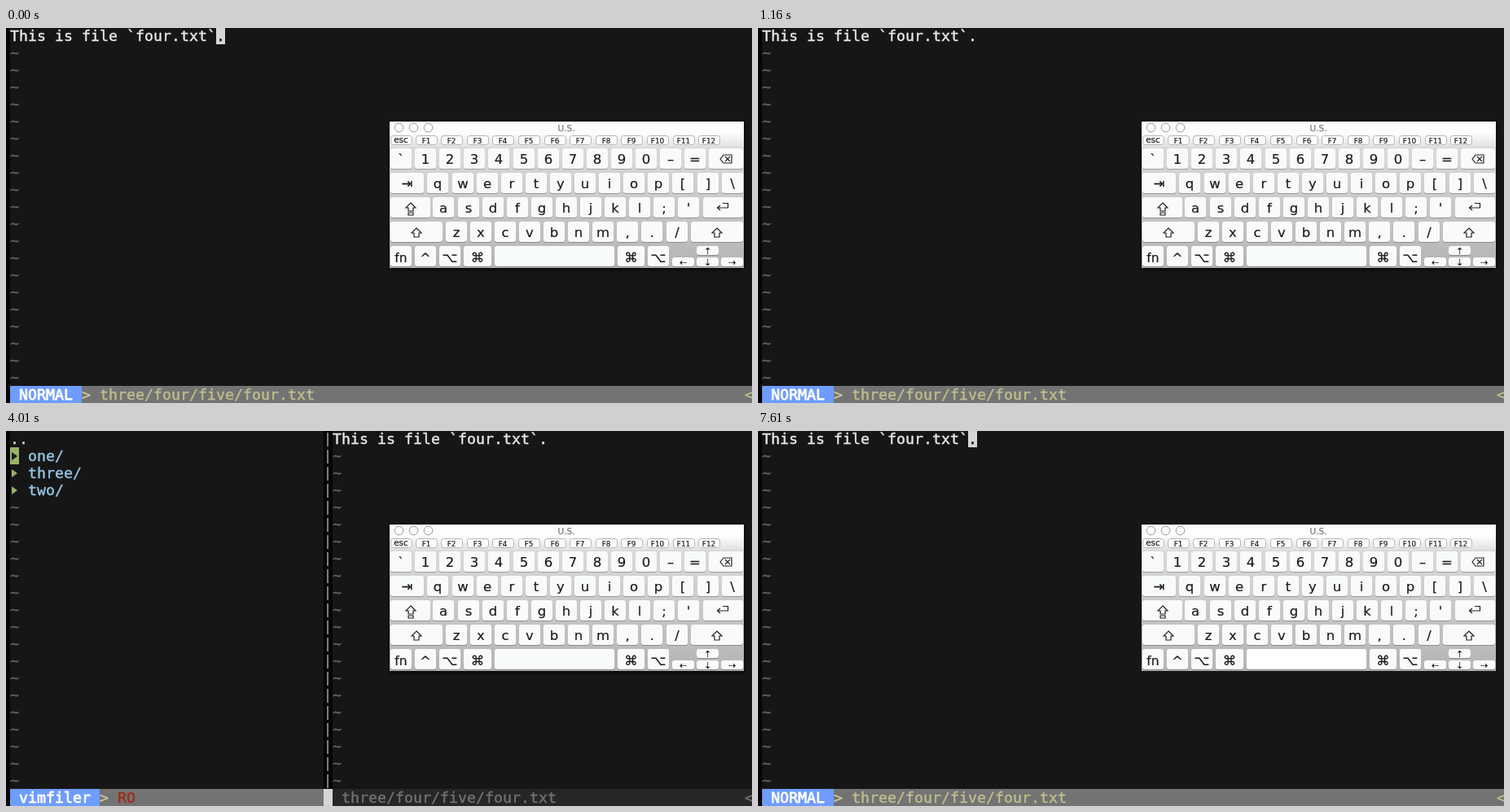
Animation of 916x461 px, one loop 8 s. Source, as an HTML page with a canvas:

```html
<!DOCTYPE html>
<html lang="en">
<head>
<meta charset="utf-8">
<title>Editor and keyboard</title>
<style>
html, body { margin: 0; width: 100%; height: 100%; overflow: hidden; background: #000; }
canvas { display: block; }
</style>
</head>
<body>
<canvas id="stage" width="916" height="461"></canvas>
<script>
const ctx = document.getElementById('stage').getContext('2d');
const LOOP = 8000, COL = 11, ROW = 21, LEFT = 5;
const MONO = '18.27px "DejaVu Sans Mono", monospace';
const SANS = '"DejaVu Sans", sans-serif';
const BG = '#161616', FG = '#e6e6e6', BLUE = '#6f9cff', GREEN = '#99b268', BAR = '#737373';

// Key presses: [key, down, up]
const presses = [
  ['space', 500, 710], ['t', 710, 860], ['r', 1010, 1160],
  ['space', 3410, 3560], ['t', 3860, 4010], ['r', 4460, 4610],
  ['space', 7460, 7610]
];

function rect(x, y, w, h, color) {
  ctx.fillStyle = color;
  ctx.fillRect(x, y, w, h);
}

// Text with a thin outline, for slightly heavier strokes
function glyphs(text, x, y, color, weight) {
  ctx.fillStyle = ctx.strokeStyle = color;
  ctx.lineWidth = weight;
  ctx.lineJoin = 'round';
  ctx.fillText(text, x, y);
  ctx.strokeText(text, x, y);
}

// ---- terminal grid ----
const colX = c => LEFT + c * COL;
const rowY = r => r ? r * ROW - 1 : 0;

function write(text, col, row, color, weight = 0.45) {
  ctx.font = MONO;
  ctx.textAlign = 'left';
  [...text].forEach((ch, i) => glyphs(ch, colX(col + i), row * ROW + 16, color, weight));
}

function cells(col, row, count, color) {
  const y = rowY(row);
  rect(colX(col), y, count * COL, (row + 1) * ROW - 1 - y, color);
}

function tildes(col, first) {
  for (let r = first; r <= 20; r++) write('~', col, r, '#686868', 0.3);
}

function statusBar(label, from, to, color) {
  rect(from, 440, to - from, 21, color);
  if (label) {
    rect(LEFT, 440, (label.length + 2) * COL, 21, BLUE);
    write(label, 1, 21, '#fff', 0.8);
    write('>', label.length + 2, 21, '#c8c8a0');
  }
}

function marker(row, color) {
  const y = row * ROW + 10;
  ctx.fillStyle = color;
  ctx.beginPath();
  ctx.moveTo(7, y - 5);
  ctx.lineTo(14, y);
  ctx.lineTo(7, y + 5);
  ctx.fill();
}

function drawEditor(cursor) {
  write('This is file `four.txt`', 0, 0, FG);
  if (cursor) cells(23, 0, 1, '#d6d6d6');
  write('.', 23, 0, cursor ? BG : FG);
  tildes(0, 1);
  statusBar('NORMAL', LEFT, 916, BAR);
  write('three/four/five/four.txt', 10, 21, '#bdbd8e');
  write('<', 82, 21, '#bdbd8e');
}

function drawExplorer() {
  write('..', 0, 0, '#d0d0d0');
  cells(0, 1, 1, GREEN);
  ['one/', 'three/', 'two/'].forEach((name, i) => {
    marker(i + 1, i ? GREEN : BG);
    write(name, 2, i + 1, '#93c4e2');
  });
  tildes(0, 4);
  rect(390, 0, 11, 440, '#050505');
  for (let r = 0; r <= 20; r++) rect(394, r * ROW + 2, 2, 17, '#857a6c');
  write('This is file `four.txt`.', 36, 0, FG);
  tildes(36, 1);
  statusBar('vimfiler', LEFT, 390, BAR);
  write('RO', 12, 21, '#9c2b16');
  rect(390, 440, 11, 21, '#d6d6d6');
  statusBar('', 401, 916, '#262626');
  write('three/four/five/four.txt', 37, 21, '#707070');
  write('<', 82, 21, '#707070');
}

// ---- on-screen keyboard ----
const PITCH = 30.1;
const keys = [];

function addKey(id, x, y, right, label = id, h = 25, size = 16.5) {
  keys.push({ id, x, y, w: right - x, h, label, size });
}

function addRun(labels, center, y) {
  labels.forEach((ch, i) => {
    const x = Math.round(center + i * PITCH - 13);
    addKey(ch, x, y, x + 26);
  });
}

addRun([...'`1234567890–='], 485, 148);
addKey('delete', 863, 148, 905, '');
addKey('tab', 472, 178, 513, '⇥');
addRun([...'qwertyuiop[]\\'], 530.4, 178);
addKey('caps', 472, 208, 521, '');
addRun([..."asdfghjkl;'"], 537.4, 208);
addKey('return', 856, 208, 905, '');
addKey('shiftL', 472, 238, 536, '');
addRun([...'zxcvbnm,./'], 552.6, 238);
addKey('shiftR', 841, 238, 905, '');
addKey('fn', 472, 268, 498, 'fn', 25, 15.5);
addKey('ctrl', 502, 268, 528, '^');
addKey('optL', 532, 268, 558, '⌥');
addKey('cmdL', 562, 268, 596, '⌘');
addKey('space', 600, 268, 747, '');
addKey('cmdR', 751, 268, 784, '⌘');
addKey('optR', 788, 268, 814, '⌥');
addKey('left', 818, 282, 845, '⇠', 11, 11);
addKey('up', 848, 268, 875, '⇡', 11, 11);
addKey('down', 848, 282, 875, '⇣', 11, 11);
addKey('right', 878, 282, 905, '⇢', 11, 11);

function rounded(x, y, w, h, r, fill) {
  ctx.fillStyle = fill;
  ctx.beginPath();
  ctx.roundRect(x, y, w, h, r);
  ctx.fill();
}

function vertical(y, h, ...colors) {
  const g = ctx.createLinearGradient(0, y, 0, y + h);
  colors.forEach((c, i) => g.addColorStop(i / (colors.length - 1), c));
  return g;
}

function label(text, x, y, size, color = '#1c1c1c') {
  ctx.font = `${size}px ${SANS}`;
  ctx.textAlign = 'center';
  glyphs(text, x, y, color, 0.2);
}

function strokePath(d, x, y) {
  ctx.save();
  ctx.translate(x, y);
  ctx.strokeStyle = '#222';
  ctx.lineWidth = 1.2;
  ctx.lineJoin = 'miter';
  ctx.stroke(new Path2D(d));
  ctx.restore();
}

const UP_ARROW = 'M0-6L6 0H3V5H-3V0H-6Z';

function drawIcons() {
  strokePath('M-7 0L-3-5H7V5H-3ZM-1-3L5 3M5-3L-1 3', 884, 161);
  strokePath(UP_ARROW, 504, 252);
  strokePath(UP_ARROW, 873, 252);
  strokePath('M0-6L6 0H3V4H-3V0H-6ZM-3 6H3V9H-3Z', 497, 221);
  strokePath('M0-4.5H6.5V1H-6M-3-2L-6.5 1L-3 4', 880, 220);
}

function drawKey(k, down, white) {
  rounded(k.x, k.y + 1, k.w, k.h, 3, 'rgba(0,0,0,.25)');
  const fill = down ? vertical(k.y, k.h, '#cacaca', '#d0d0d0', '#c2c2c2')
    : white ? '#fff' : '#f9fafa';
  rounded(k.x, k.y, k.w, k.h, 3, fill);
  if (!k.label) return;
  const base = k.h < 20 ? k.y + 9.5 : k.y + (k.y === 268 ? 20 : 19);
  label(k.label, k.x + k.w / 2, base, k.size);
}

function drawKeyboard(t) {
  ctx.save();
  if (t < 4460) {
    ctx.shadowColor = 'rgba(0,0,0,.7)';
    ctx.shadowBlur = 5;
    ctx.shadowOffsetY = 2;
  }
  rect(471, 115, 435, 180, '#fdfdfd');
  ctx.restore();
  rect(471, 131, 435, 15, vertical(131, 15, '#fafafa', '#e2e2e2'));
  rect(471, 146, 435, 149, vertical(146, 149, '#dadada', '#c8c8c8', '#b4b4b4'));

  ctx.strokeStyle = '#969696';
  ctx.lineWidth = 1;
  for (const x of [482.5, 500.5, 518.5]) {
    ctx.beginPath();
    ctx.arc(x, 122.5, 5.3, 0, Math.PI * 2);
    ctx.stroke();
  }
  label('U.S.', 688, 127, 10.5, '#777');

  for (let i = 0; i <= 12; i++) {
    const x = i ? Math.round(516.5 + (i - 1) * 31.6) - 13.5 : 472.5;
    rounded(x, 132.5, 26, 11, 3, '#fcfcfc');
    ctx.strokeStyle = '#b4b4b4';
    ctx.lineWidth = 1;
    ctx.stroke();
    label(i ? 'F' + i : 'esc', x + 12.5, i ? 142 : 141, i ? 8.8 : 10.5);
  }

  const active = presses.find(p => t >= p[1] && t < p[2]);
  const bright = t >= 710 && t < 860;
  for (const k of keys) {
    drawKey(k, active && active[0] === k.id, bright || (k.id === 'space' && t >= 7610));
  }
  drawIcons();
}

function draw(t) {
  rect(0, 0, 916, 461, BG);
  rect(0, 0, LEFT, 461, '#050505');
  if (t >= 1460 && t < 4460) drawExplorer();
  else drawEditor(t < 1160 || t >= 4460);
  drawKeyboard(t);
}

const start = performance.now();
function tick() {
  draw((performance.now() - start) % LOOP);
  requestAnimationFrame(tick);
}
tick();
</script>
</body>
</html>
```
